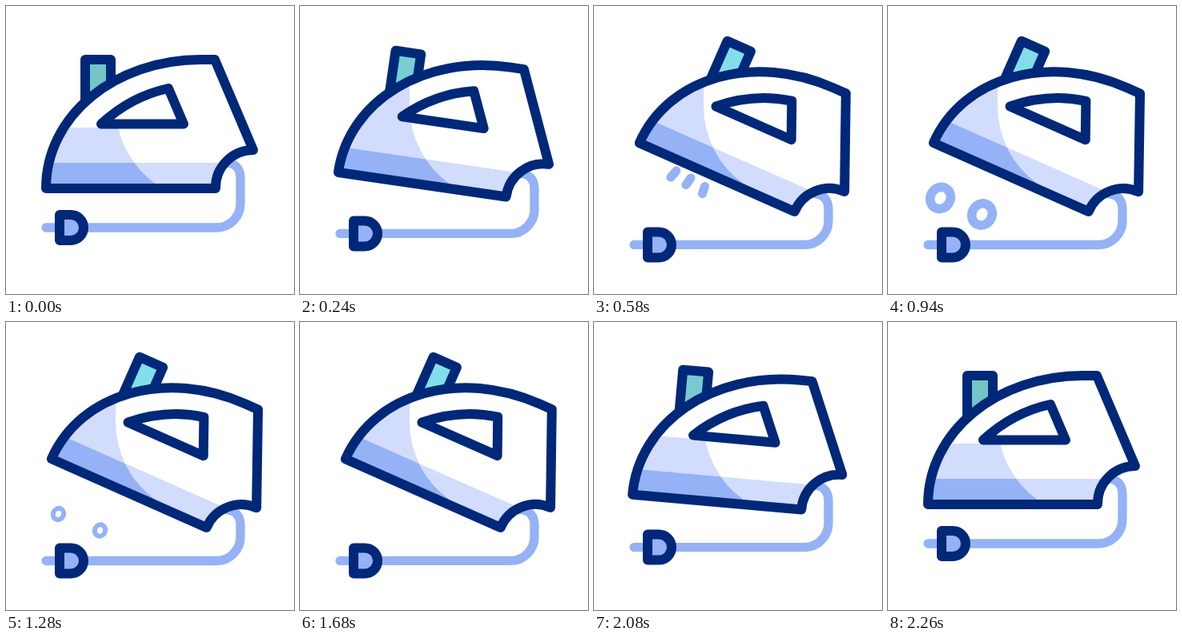
An HTML page with a canvas that plays this animation: 360 px wide and 360 px high, repeating every 2400 ms.

```html
<!DOCTYPE html>
<html lang="en">
<head>
<meta charset="utf-8">
<title>Steam iron</title>
<style>
  html, body { margin: 0; width: 100%; height: 100%; overflow: hidden; background: #fff; }
  canvas { display: block; }
</style>
</head>
<body>
<canvas width="360" height="360"></canvas>
<script>
const ctx = document.querySelector('canvas').getContext('2d');
const LOOP = 2400, NAVY = '#002878', BLUE = '#94b2f5', PALE = '#d2dcfd', WHITE = '#fff';

const body = new Path2D('M50 228C50 137 136 67 244 67H261L309 180A47 47 0 0 0 262 228Z');
const stem = new Path2D('M99 122V67H131V95');
const handle = new Path2D('M119 147.5H222L203 103Q156 113 119 147.5Z');
const plug = new Path2D('M67 261H81A16 16 0 0 1 81 293H67Z');
// The lit side stays fixed on the stage while the iron tilts.
const light = new Path2D('M137 0V125A119 119 0 0 0 187 222L230 260H360V0Z');

const dashes = [[103, 206, -7, 8], [121, 215, -6, 8.5], [138.5, 225.5, -3, 9]];
const rings = [[92, 216, 65.5, 240], [125, 236, 117.5, 260.5]];

const ramp = (t, a, b) => Math.max(0, Math.min(1, (t - a) / (b - a)));
const ease = (t, a, b) => { const x = ramp(t, a, b); return x * x * (3 - 2 * x); };
const mix = (a, b, k) => a + (b - a) * k;

function fill(path, color) {
  ctx.fillStyle = color;
  ctx.fill(path);
}

function stroke(path, color, width = 12) {
  ctx.strokeStyle = color;
  ctx.lineWidth = width;
  ctx.stroke(path);
}

function drawCord(p) {
  const y = 277 + 21.5 * p, top = 215 + 39 * p;
  stroke(new Path2D(`M50 ${y}H263A30 30 0 0 0 293 ${y - 30}V${top}Q293 ${top - 19} 272 ${top - 20}`), BLUE, 11.3);
  ctx.save();
  ctx.translate(0, y - 277);
  fill(plug, BLUE);
  stroke(plug, NAVY);
  ctx.restore();
}

function drawSteam(t) {
  const head = ease(t, 520, 580), tail = ease(t, 620, 800), drift = ramp(t, 580, 800) * 1.4;
  if (head > 0 && tail < 1) {
    for (const [x, y, dx, dy] of dashes) {
      const from = drift + tail * 0.5, to = from + head * (1 - tail);
      stroke(new Path2D(`M${x + dx * from} ${y + dy * from}L${x + dx * to} ${y + dy * to}`), BLUE, 11 * head * (1 - tail));
    }
  }
  const move = ease(t, 660, 940), size = move * (1 - ease(t, 1140, 1430));
  if (size <= 0) return;
  for (const [x0, y0, x1, y1] of rings) {
    const ring = new Path2D();
    ring.ellipse(mix(x0, x1, move), mix(y0, y1, move), 12.5 * size, 14 * size, 0.5, 0, 7);
    stroke(ring, BLUE, 11.5 * size);
  }
}

function tilt(p) {
  ctx.translate(280 - 1.5 * p, 200 + 38.7 * p);
  ctx.rotate(p * 23.9 * Math.PI / 180);
  ctx.translate(-280, -200);
}

function paintBody(p, upper, band) {
  ctx.save();
  tilt(p);
  ctx.clip(body);
  ctx.fillStyle = upper;
  ctx.fillRect(0, 0, 360, 360);
  ctx.fillStyle = band;
  ctx.fillRect(0, 196, 360, 60);
  ctx.restore();
}

function drawIron(p, t) {
  ctx.save();
  tilt(p);
  fill(stem, `rgb(${mix(116, 130, p)} ${mix(196, 223, p)} ${mix(200, 233, p)})`);
  stroke(stem, NAVY);
  ctx.restore();

  paintBody(p, PALE, BLUE);
  ctx.save();
  ctx.clip(light);
  paintBody(p, WHITE, PALE);
  ctx.restore();

  ctx.save();
  tilt(p);
  const level = mix(60, 152, 1 - ease(t, 40, 240) + ease(t, 1720, 1930));
  ctx.save();
  ctx.clip(body);
  ctx.fillStyle = WHITE;
  ctx.fillRect(40, 0, 108, level);
  ctx.restore();
  fill(handle, WHITE);
  stroke(body, NAVY);
  stroke(handle, NAVY);
  ctx.restore();
}

function draw(now) {
  const t = now % LOOP;
  const p = ease(t, 5, 600) - ease(t, 1660, 2260);
  ctx.fillStyle = WHITE;
  ctx.fillRect(0, 0, 360, 360);
  ctx.lineCap = ctx.lineJoin = 'round';
  drawCord(p);
  drawSteam(t);
  drawIron(p, t);
}

const start = performance.now();
(function frame() {
  draw(performance.now() - start);
  requestAnimationFrame(frame);
})();
</script>
</body>
</html>
```
